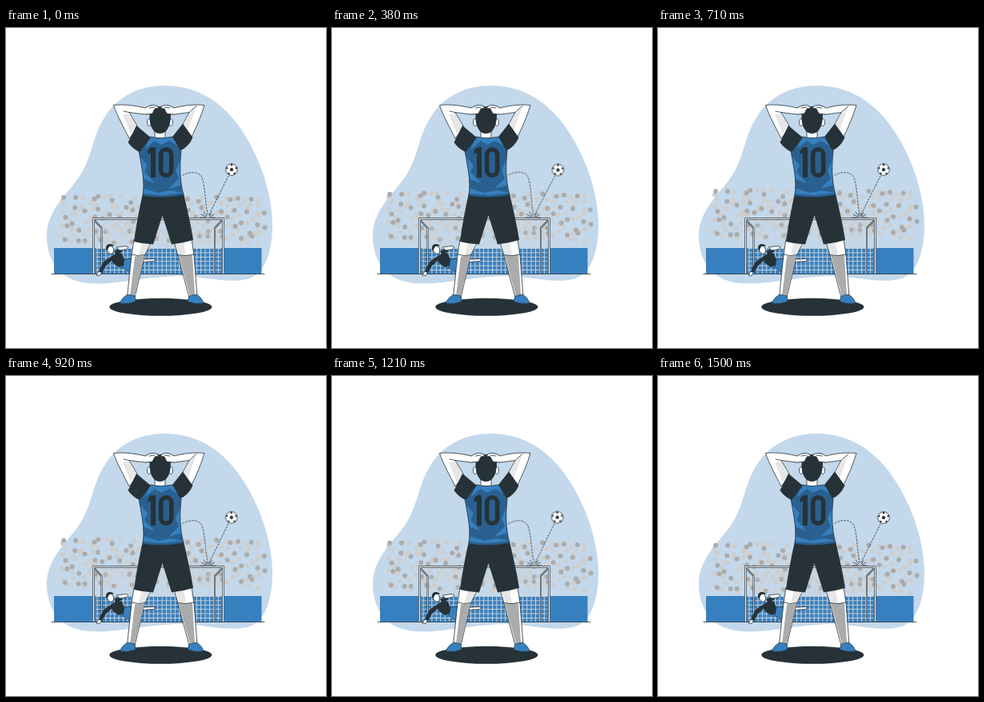
Write an HTML page that moves like this. It is 400 px wide and 400 px high and loops after 1.54 s.

```html
<!DOCTYPE html>
<html lang="en">
<head>
<meta charset="utf-8">
<title>Missed penalty</title>
<style>
  html, body { margin: 0; width: 100%; height: 100%; overflow: hidden; background: #fff; }
  svg { display: block; width: 100%; height: 100%; }
  .line { fill: none; stroke: #263238; stroke-width: .8; stroke-linecap: round; stroke-linejoin: round; }
  .skin { fill: #fff; stroke: #263238; stroke-width: .8; stroke-linejoin: round; }
  .dark { fill: #263238; }
  .blue { fill: #3780bf; }
  .shade { fill: #e6e6e6; }
  .sock { fill: #ababab; }
  #crowd { animation: float 1540ms linear infinite; }
  #shot { transform-origin: 256px 203px; animation: sway 1540ms linear infinite; }
  /* a 1500 ms cycle followed by a 40 ms rest */
  @keyframes float {
    0%, 97.4%, 100% { transform: translateY(0); }
    48.7% { transform: translateY(-8px); }
  }
  @keyframes sway {
    0%, 97.4%, 100% { transform: rotate(0deg); }
    24.35% { transform: rotate(1deg); }
    73.05% { transform: rotate(-1deg); }
  }
</style>
</head>
<body>
<svg viewBox="0 0 400 400">
  <defs>
    <pattern id="mesh" x="119" y="275" width="5.4" height="5.4" patternUnits="userSpaceOnUse">
      <path d="M0 .5H5.4M.5 0V5.4" fill="none" stroke="#cdd1d5"/>
    </pattern>
    <path id="shirt" d="M181 136Q192 139 208 136L217 146L219 154C217 172 217 190 222 209Q196 214 171 210C174 190 169 172 166 153L172 144Z"/>
    <clipPath id="shirtClip"><use href="#shirt"/></clipPath>
    <path id="netFrame" d="M110 240L119.500 250V307M270.500 240L261 250V307"/>
    <path id="goalFrame" d="M109.500 307V238.500H271.500V307"/>
  </defs>

  <path fill="#c3d8eb" d="M198 72C233 72 263 87 286 116C313 150 333 201 333 246C333 279 324 309 301 314C274 320 244 309 212 310C172 312 150 318 118 319.500C96 320 79 316 67 304C55 292 50 273 51 256C53 229 73 210 88 191C108 165 106 139 123 112C139 85 168 72 198 72Z"/>

  <g id="crowd"></g>

  <rect class="blue" x="60" y="275" width="259.500" height="32.500"/>
  <path class="line" d="M57 307.500H323"/>

  <g id="goal" fill="none" stroke-linejoin="round">
    <path fill="url(#mesh)" opacity=".5" d="M111 240H270L261 250V275H119V250Z"/>
    <rect fill="url(#mesh)" x="112" y="275" width="157" height="32"/>
    <use href="#netFrame" stroke="#263238" stroke-width="2"/>
    <use href="#netFrame" stroke="#dfe7ee" stroke-width=".8"/>
    <use href="#goalFrame" stroke="#263238" stroke-width="3"/>
    <use href="#goalFrame" stroke="#e9eef3" stroke-width="1.600"/>
  </g>

  <g id="keeper">
    <path class="skin" d="M152 289L176 289L186 288.500V291.500L176 292L153 297Z"/>
    <path class="blue" d="M146 290L155 288L160 292L154 305L146 300Z" stroke="#263238" stroke-width=".6"/>
    <path class="dark" d="M134 284L139 281L145 282L148 290L147 297L141 299L135 295L132 291L125 297L120 306L116 304L122 292Z"/>
    <path class="dark" d="M135 279L143 276L146 279L138 284Z"/>
    <path class="skin" d="M138 274L150 272.500L153 274L151 276.500L142 278Z"/>
    <path class="skin" d="M116 304L119.500 306L117 309.500L113 309Z"/>
    <ellipse class="skin" cx="130.500" cy="277" rx="4" ry="5.500" transform="rotate(-18 130.500 277)"/>
    <path class="dark" d="M125 277C124 270 130 268 135 272L133 273C129 272 128 274 127 278Z"/>
  </g>

  <g id="shot">
    <path class="line" stroke-dasharray="2 2" d="M221 184C230 179 241 179 245 187C249 198 249 218 252 233M254 233L278 185"/>
    <path class="line" d="M250 236L244 233M251 235L247 230M254 235L257 230.500M255 236L260 233M249 237H243M256 237H261"/>
    <circle class="skin" cx="282" cy="177" r="7.300"/>
    <g id="patches" class="dark"></g>
  </g>

  <g id="player">
    <ellipse class="dark" cx="193.300" cy="348.800" rx="64" ry="11"/>

    <path class="skin" d="M160 264H183L173.500 284L161 337L151.500 336L157 284Z"/>
    <path class="skin" d="M209 264H232L235 284L239 336L229 337L215 284Z"/>
    <path class="shade" d="M170 268H181L173 283H166ZM211 268H222L225 283H216Z"/>
    <path class="sock" d="M161 285.500L173 284L161 335H155ZM216 284L233 284L236 334H229.500Z"/>
    <path class="line" d="M157 283Q165 286 173.500 283.500M215 283.500Q225 286 235 283"/>
    <path class="blue" d="M152 333L161 335L162 342Q152 346 142 344Q145 337 152 333Z" stroke="#263238" stroke-width=".7"/>
    <path class="blue" d="M238 333L229 335L227 342Q237 346 247 344Q245 337 238 333Z" stroke="#263238" stroke-width=".7"/>

    <path class="dark" d="M171 207H222C226 225 231 245 234 265Q221 269 207 270.500L195.500 234L184 270.500Q171 270 160 267C163 245 167 224 171 207Z"/>

    <path class="skin" d="M134.500 96.500C148 95 162 97 174 100L182 97L190 98L187 106L174 108L154 105.500L165 124L154 138C147 124 139 110 134.500 96.500Z"/>
    <path class="skin" d="M248 96.500C235 95 221 97 210 100L202 97L194 98L197 106L210 108L229 105.500L219 124L231 138C238 124 244 110 248 96.500Z"/>
    <path class="shade" d="M146 108L154 107L163 122L156 133ZM238 98L229 107L220 123L226 131Z"/>
    <path class="line" d="M154 105.500L147 104M229 105.500L238 97.500"/>

    <path class="skin" d="M186 126H199V140H186Z"/>
    <use href="#shirt" fill="#29608f"/>
    <g class="blue" clip-path="url(#shirtClip)">
      <path d="M180 135H210L216 148L204 141L194 146L186 141L174 151Z"/>
      <path d="M167 160L177 172L173 180L186 194L171 188Z"/>
      <path d="M220 160L212 178L216 188L203 201L220 196Z"/>
      <path d="M171 200L190 206L206 203L222 206L196 209L171 207Z"/>
    </g>
    <use href="#shirt" class="line"/>
    <path class="dark" d="M163 122L181 137L167 155Q158 151 152.500 143Z"/>
    <path class="dark" d="M221 119.500L208 136L218 153Q228 149 233.500 137Z"/>

    <g role="img" aria-label="10">
      <path class="dark" d="M181.500 149H187V187H181V156L177.500 157.500V153Z"/>
      <rect x="193.700" y="151.800" width="13" height="32.400" rx="6.500" fill="none" stroke="#263238" stroke-width="5.600"/>
    </g>

    <ellipse class="skin" cx="179" cy="118" rx="2.400" ry="4.500"/>
    <ellipse class="skin" cx="206" cy="118" rx="2.400" ry="4.500"/>
    <path class="dark" d="M179.500 108C181 101 187 98 193 98C200 98 205 102 206 108C206 118 204 125 199 130Q192 134 186 130C181 125 179 118 179.500 108Z"/>
    <path class="skin" d="M174 100Q181 95 188 97L191 100L186 101L183 107L174 108"/>
    <path class="skin" d="M210 100Q203 95 196 97L193 100L198 101L201 107L210 108"/>
    <path class="line" d="M179 100L186 99M205 100L198 99"/>
  </g>
</svg>
<script>
  const NS = "http://www.w3.org/2000/svg";
  const crowd = document.getElementById("crowd");
  const patches = document.getElementById("patches");

  function add(parent, tag, attrs) {
    const el = document.createElementNS(NS, tag);
    for (const key in attrs) el.setAttribute(key, attrs[key]);
    parent.append(el);
  }

  let seed = 29;
  function random() {
    seed = (seed * 16807) % 2147483647;
    return seed / 2147483647;
  }

  // heads on a jittered, staggered grid
  function fillCrowd(cols, rows, fill) {
    const dx = 255 / cols, dy = 62 / rows;
    for (let row = 0; row < rows; row++) {
      for (let col = 0; col < cols; col++) {
        const cx = 71 + (col + (row % 2) * .5 + (random() - .5) * .8) * dx;
        const cy = 210 + (row + random() * .9) * dy;
        add(crowd, "circle", { cx: Math.min(326, Math.max(71, cx)), cy, r: 3, fill });
      }
    }
  }
  fillCrowd(20, 8, "#cecece");
  fillCrowd(15, 5, "#ababab");

  // centre pentagon and five rim patches
  function pentagon(cx, cy, r, turn) {
    const points = [];
    for (let i = 0; i < 5; i++) {
      const a = turn + i * Math.PI * .4;
      points.push([cx + r * Math.cos(a), cy + r * Math.sin(a)]);
    }
    add(patches, "polygon", { points: points.join(" ") });
  }
  pentagon(282, 177, 2.4, -Math.PI / 2);
  for (let i = 0; i < 5; i++) {
    const a = -Math.PI / 2 + i * Math.PI * .4;
    pentagon(282 + 6 * Math.cos(a), 177 + 6 * Math.sin(a), 1.4, a + Math.PI);
  }
</script>
</body>
</html>
```
